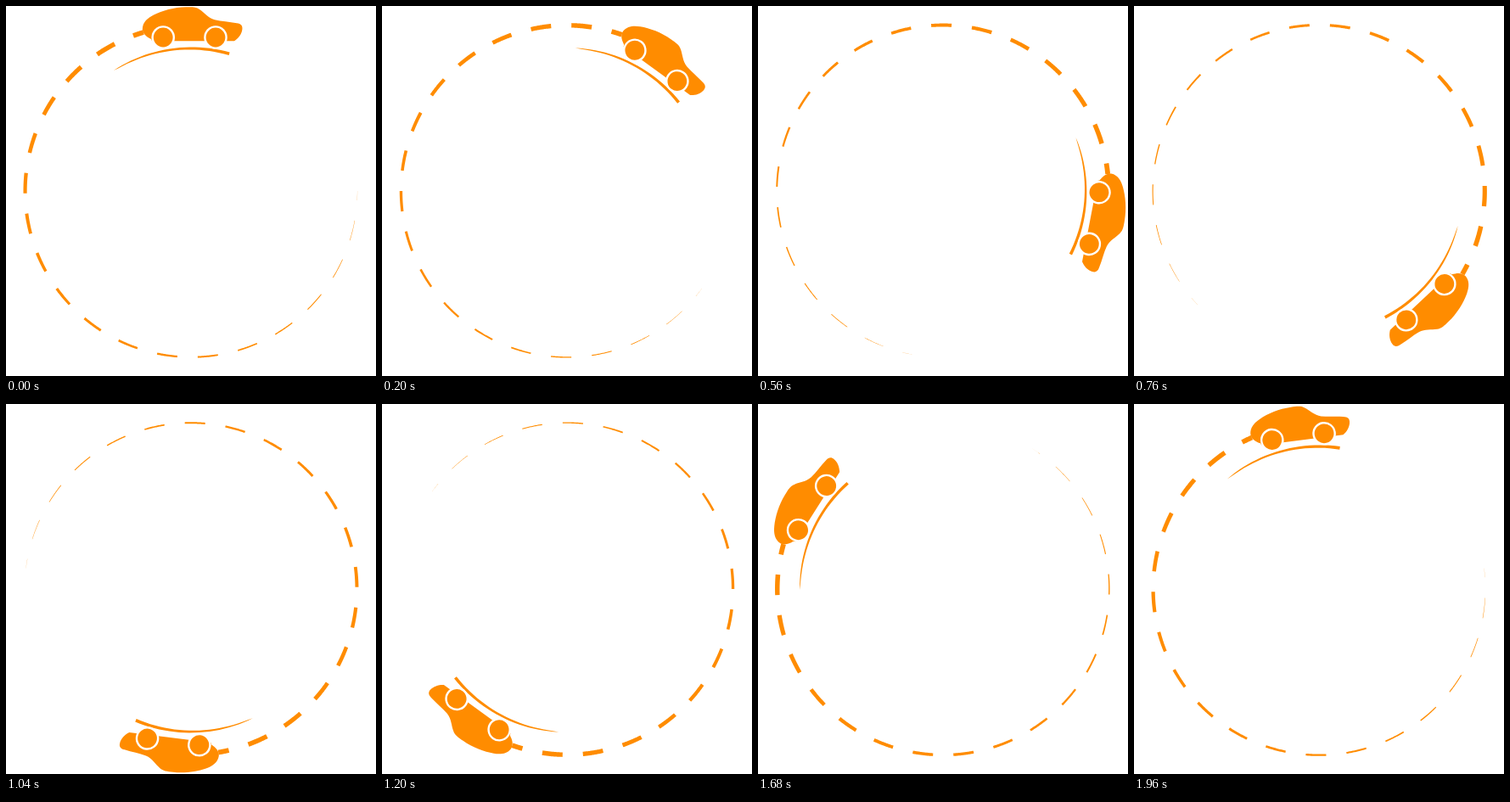
Animation, 436 px wide and 436 px high, one loop 2 s. Source, as an HTML page with a canvas:

```html
<!DOCTYPE html>
<html lang="en">
<head>
<meta charset="utf-8">
<title>Car on a circular road</title>
<style>
  html, body { margin: 0; width: 100%; height: 100%; overflow: hidden; background: #fff; }
  canvas { display: block; }
</style>
</head>
<body>
<canvas id="stage" width="436" height="436"></canvas>
<script>
const ctx = document.getElementById('stage').getContext('2d');
const ORANGE = '#ff8c00', C = 218, LOOP = 2000, STEP = 40;

const body = new Path2D(`M160.8 27
  C161 19 167 14 174 10.5 C184 5.5 198 1.5 212 1.3
  C219 1.1 224 1 228 4 C234 8 238 14 246 16.3
  C254 18.3 263 18.5 272 20.3 C277 21 279 23.5 278.4 27.5
  C277.8 33 274 38 269 41.3 L172 41.3 L171 39
  C166 36.5 161 33 160.8 27 Z`);

// Ring segment between two angles (degrees clockwise from the top).
function band(from, to, inner, outer) {
  const n = 24, pts = [];
  const add = (deg, r) => {
    const a = deg * Math.PI / 180;
    pts.push([C + r * Math.sin(a), C - r * Math.cos(a)]);
  };
  for (let i = 0; i <= n; i++) {
    const a = from + (to - from) * i / n;
    add(a, outer(a));
  }
  for (let i = n; i >= 0; i--) {
    const a = from + (to - from) * i / n;
    add(a, inner(a));
  }
  ctx.beginPath();
  pts.forEach(([x, y]) => ctx.lineTo(x, y));
  ctx.fill();
}

function disc(x, y, r, color) {
  ctx.fillStyle = color;
  ctx.beginPath();
  ctx.arc(x, y, r, 0, 2 * Math.PI);
  ctx.fill();
}

function drawTrail() {
  const start = -270, end = -16.7;
  const grow = a => (a - start) / (end - start);
  for (let k = -1; k < 18; k++) {
    const mid = -30.95 - 14.08 * k;
    band(Math.max(start, mid - 3.52), Math.min(end, mid + 3.52),
      a => 196 - 3.7 * grow(a), a => 196.1 + 2 * grow(a));
  }
}

function drawRoad() {
  const start = -32.7, end = 15.6;
  const grow = a => Math.sqrt((a - start) / (end - start));
  band(start, end, a => 168.7 - 2.6 * grow(a), a => 168.7 + grow(a));
}

function drawCar() {
  ctx.fill(body);
  for (const x of [185.2, 247]) {
    disc(x, 37, 13.8, '#fff');
    disc(x, 37, 11.4, ORANGE);
  }
}

function draw(now) {
  const t = Math.floor(now % LOOP / STEP) * STEP;
  ctx.fillStyle = '#fff';
  ctx.fillRect(0, 0, 436, 436);
  ctx.save();
  ctx.translate(C, C);
  ctx.rotate(2 * Math.PI * t / LOOP);
  ctx.translate(-C, -C);
  ctx.fillStyle = ORANGE;
  drawTrail();
  drawRoad();
  drawCar();
  ctx.restore();
}

let begin;
function tick(now) {
  begin ??= now;
  draw(now - begin);
  requestAnimationFrame(tick);
}
draw(0);
requestAnimationFrame(tick);
</script>
</body>
</html>
```
